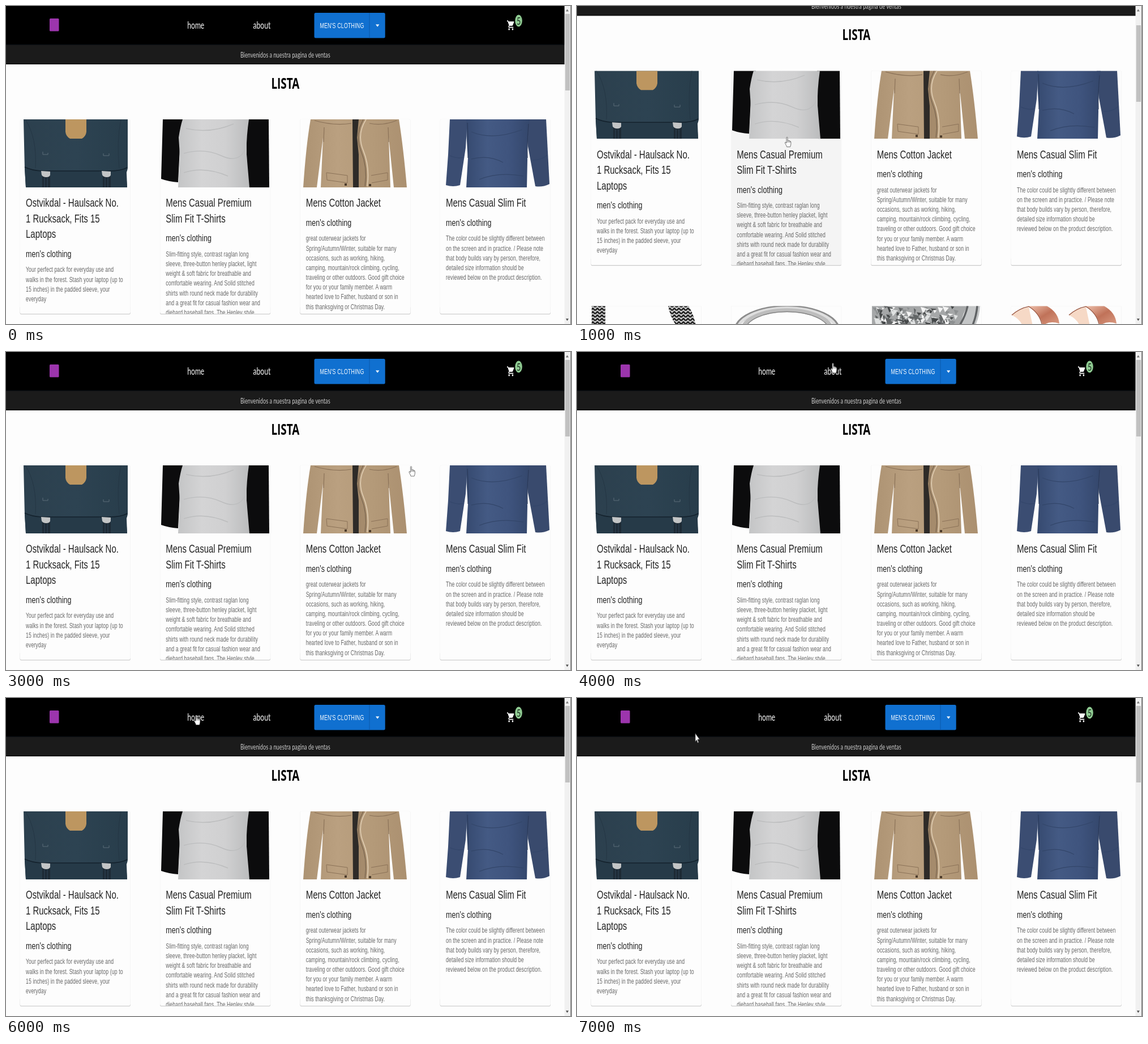
Animation, 998 px wide and 561 px high, one loop 8000 ms. Source, as an HTML page:

```html
<!DOCTYPE html>
<html lang="en">
<head>
<meta charset="utf-8">
<title>Shop list</title>
<style>
  html, body { margin: 0; width: 100%; height: 100%; overflow: hidden; background: #fdfdfd; }
  svg { display: block; }
  text { font-family: "Liberation Sans", Arial, sans-serif; white-space: pre; }
  .nav { font-family: Lato, sans-serif; }
  .head { font-family: "Open Sans", sans-serif; font-weight: 700; }
</style>
</head>
<body>
<svg id="stage" width="998" height="561" xmlns="http://www.w3.org/2000/svg"></svg>
<script>
// The page is 1600 x 654 px, shown squeezed to the stage.
const SX = 998 / 1600, SY = 0.858;
const SCALE = `scale(${SX} ${SY})`;
const TOP = 200, LINE = 27.47, ROW2 = 615;

const text = (x, y, size, str, attrs = '') =>
  `<text transform="translate(${x} ${y}) ${SCALE}" font-size="${size}" ${attrs}>${str}</text>`;
const rect = (x, y, w, h, fill, attrs = '') =>
  `<rect x="${x}" y="${y}" width="${w}" height="${h}" fill="${fill}" ${attrs}/>`;
const path = (d, fill, attrs = '') => `<path d="${d}" fill="${fill}" ${attrs}/>`;
const line = (d, color, width = 1, attrs = '') =>
  path(d, 'none', `stroke="${color}" stroke-width="${width}" ${attrs}`);
const gradient = (id, colors, attrs = '') => `<linearGradient id="${id}" ${attrs}>` +
  colors.map((c, i) => `<stop offset="${i / (colors.length - 1)}" stop-color="${c}"/>`).join('') +
  '</linearGradient>';

function backpack() {
  const buckle = x => rect(x + 2, 300, 14, 20, '#1d2a35') +
    line(`M${x + 6} 303v17m5 -17v17`, '#33475a', 1) +
    path(`M${x} 291l16 1v6q-1 4 -7 4t-8 -4z`, '#c3c5c6');
  return path('M31 200H215V286Q214 292 212 294L214 320H35L33 288Z', 'url(#pack)') +
    path('M33 284Q45 289 62 291H182Q204 291 214 285L213 294L214 320H35Z', '#263a48') +
    line('M33 284Q45 290 62 291H182Q204 291 214 285', '#14222d', 1.6) +
    line('M34 200Q55 232 52 286M203 200Q195 240 200 286', '#243644', 1) +
    line('M65 257v5h9v-3M172 260v4h10v-4', '#5a6c78', 1) +
    path('M105 200H142V222Q141 230 134 234H113Q106 230 105 222Z', '#bd9660') +
    buckle(62) + buckle(169);
}

function tee() {
  return path('M277 200H316L308 232L304 311Q288 310 274 305Z', '#0c0c0d') +
    path('M424 200H464L465 320H426Z', '#0c0c0d') +
    path('M312 200H429Q424 235 425 262L430 320H304L307 262L305 232Q308 212 312 200Z', 'url(#tee)') +
    line('M318 216Q360 226 402 208M314 260Q350 250 380 264T422 254M314 294Q350 282 392 300', '#bcbdbe', 1.4);
}

function jacket() {
  return path('M538 200H694Q702 250 708 320H685L676 232L679 320H556L560 232L549 320H525Q530 246 538 200Z', 'url(#jacket)') +
    path('M612 200H636Q620 226 630 255T637 320H613Z', '#a58b6c') +
    path('M612 200H623L620 232L623 262V320H613Z', '#2e2b28') +
    line('M636 200Q619 226 631 255T638 318', '#dcc8ac', 2) +
    line('M631 200Q615 228 627 256T634 318', '#6f5c48', 1) +
    line('M545 202Q580 212 610 207M642 207Q665 212 690 202M562 214L561 240M675 214L676 240', '#8b7258', 1.2) +
    line('M566 294L603 299V312L567 307ZM645 299L674 294V307L646 312', '#8b7258', 1) +
    path('M598 313h4v4h-4zM641 314h4v4h-4z', '#4c3b2b');
}

function slimShirt() {
  return path('M784 200H815L812 250L802 316Q790 320 777 316L781 262Z', '#3b4d72') +
    path('M918 200H954L960 314Q948 320 935 318L922 248Z', '#394a6d') +
    path('M813 200H925Q920 244 921 272L920 320H813L816 268Q813 236 813 200Z', 'url(#slim)') +
    line('M815 206Q817 240 816 268M923 208Q920 240 921 268', '#2b3a59', 1.2) +
    line('M822 222Q860 238 912 218M822 270Q852 262 878 276M836 306Q870 292 914 300M784 264q14 6 24 3M930 272q16 0 26 -9', '#33466a', 1.3);
}

function bracelet() {
  return rect(26, ROW2, 24, 40, 'url(#weave)') +
    path('M161 615H197Q207 630 211 655H180Q166 640 161 615Z', 'url(#weave)');
}

function ring() {
  const arc = (r, color, w) =>
    `<ellipse cx="371" cy="659" rx="${r}" ry="${r * .46}" fill="none" stroke="${color}" stroke-width="${w}"/>`;
  return arc(90, '#8c8c8c', 8) + arc(88, '#dedede', 5) + arc(79, '#bdbdbd', 7) + arc(74, '#858585', 1.5);
}

function sparkle() {
  let seed = 7, out = path('M521 615H690Q681 628 676 655H521Z', '#a5a7a8');
  const rnd = () => (seed = seed * 16807 % 2147483647) / 2147483647;
  const shades = ['#454849', '#8d9091', '#e0e2e2', '#f4f4f4', '#636667'];
  for (let i = 0; i < 170; i++) {
    const y = ROW2 + rnd() * 33, x = 522 + rnd() * (150 - (y - ROW2) * .3);
    const w = 4 + rnd() * 8, h = 3 + rnd() * 7;
    out += path(`M${x.toFixed(1)} ${y.toFixed(1)}l${w.toFixed(1)} ${(h * .3).toFixed(1)}l${(-w * .6).toFixed(1)} ${h.toFixed(1)}z`, shades[i % 5]);
  }
  return out + path('M690 615H712Q711 636 701 655H670Q684 638 690 615Z', '#c4c6c7') +
    line('M690 615Q685 637 672 655M707 615Q705 637 696 655', '#606365', 3.5);
}

function roseRings() {
  const one = x => `<g transform="translate(${x} 0)">` +
    path('M0 631Q14 619 30 617L38 655H20Q18 640 0 631Z', '#f6d9c6') +
    path('M28 615H62Q82 626 84 646Q66 640 55 650Q50 628 28 615Z', 'url(#rose)') +
    line('M0 631Q14 619 30 616Q50 628 54 651', '#96543f', 1.3) + '</g>';
  return one(768) + one(869);
}

const products = [
  [25, ['Ostvikdal - Haulsack No.', '1 Rucksack, Fits 15', 'Laptops'], [
    'Your perfect pack for everyday use and',
    'walks in the forest. Stash your laptop (up to',
    '15 inches) in the padded sleeve, your', 'everyday'], backpack, bracelet],
  [272.3, ['Mens Casual Premium', 'Slim Fit T-Shirts'], [
    'Slim-fitting style, contrast raglan long',
    'sleeve, three-button henley placket, light',
    'weight &amp; soft fabric for breathable and',
    'comfortable wearing. And Solid stitched',
    'shirts with round neck made for durability',
    'and a great fit for casual fashion wear and',
    'diehard baseball fans. The Henley style'], tee, ring],
  [519.7, ['Mens Cotton Jacket'], [
    'great outerwear jackets for',
    'Spring/Autumn/Winter, suitable for many',
    'occasions, such as working, hiking,',
    'camping, mountain/rock climbing, cycling,',
    'traveling or other outdoors. Good gift choice',
    'for you or your family member. A warm',
    'hearted love to Father, husband or son in',
    'this thanksgiving or Christmas Day.'], jacket, sparkle],
  [767, ['Mens Casual Slim Fit'], [
    'The color could be slightly different between',
    'on the screen and in practice. / Please note',
    'that body builds vary by person, therefore,',
    'detailed size information should be',
    'reviewed below on the product description.'], slimShirt, roseRings]
];

const frame = (x, y, body) =>
  rect(x - .3, y + 330, 195.1, 14, '#c6c6c6', 'rx="2.5"') +
  rect(x - .4, y - .3, 195.3, 342, '#f2f2f2', 'rx="2.5"') +
  `<svg x="${x}" y="${y}" width="194.5" height="343" viewBox="${x} ${y} 194.5 343">` +
  rect(x, y, 194.5, 343, '#fdfdfd', 'rx="2.5"') + body + '</svg>';

function card([x, title, body, photo, nextPhoto], i) {
  const left = x + 10, shift = (title.length - 1) * LINE;
  const words =
    title.map((s, k) => text(left, 354.4 + k * LINE, 24, s, 'fill="#222"')).join('') +
    text(left, 387.9 + shift, 20, "men's clothing", 'fill="#222" letter-spacing=".0075em"') +
    body.map((s, k) => text(left, 414.4 + shift + k * 17.18, 14, s,
      'fill="#666" letter-spacing=".0107em"')).join('');
  const hover = i === 1 ? rect(x, TOP, 194.5, 343, '#f4f4f4', 'id="hover"') : '';
  return frame(x, TOP, hover + `<svg x="0" y="${TOP}" width="998" height="120" viewBox="0 ${TOP} 998 120">${photo()}</svg>` + words) +
    frame(x, ROW2, nextPhoto());
}

const cart = 'M7 18c-1.1 0-2 .9-2 2s.9 2 2 2 2-.9 2-2-.9-2-2-2zM1 2v2h2l3.6 7.6-1.35 2.44c-.16.28-.25.61-.25.96 0 1.1.9 2 2 2h12v-2H7.42c-.14 0-.25-.11-.25-.25l.03-.12.9-1.63h7.45c.75 0 1.41-.41 1.75-1.03l3.58-6.49A1 1 0 0 0 20 4H5.21l-.94-2H1zm16 16c-1.1 0-2 .9-2 2s.9 2 2 2 2-.9 2-2-.9-2-2-2z';

const header =
  rect(0, 0, 987, 69, '#000') + rect(0, 68, 987, 35, '#1b1b1b') + rect(0, 67.5, 987, 1.5, '#0b0e13') +
  rect(0, 101.5, 987, 1.5, '#111') +
  rect(77, 22, 16.5, 22.5, '#9c35ad', 'rx="1.5"') +
  text(320.3, 40, 19.4, 'home', 'class="nav" fill="#fff"') +
  text(436.5, 40, 19.4, 'about', 'class="nav" fill="#fff"') +
  rect(544.5, 12, 125.2, 44.5, '#1070d0', 'rx="2.5"') + rect(641.6, 12, .8, 44.5, '#0a55a4') +
  text(554.5, 38.6, 14, "MEN'S CLOTHING", 'fill="#fff" letter-spacing=".0286em"') +
  path('M653 32.4h6.4l-3.2 4.4z', '#fff') +
  path(cart, '#fff', `transform="translate(884.3 23.8) ${SCALE}"`) +
  '<ellipse cx="905.5" cy="26" rx="6.3" ry="10.4" fill="#8fcb92"/>' +
  text(905.5, 32.6, 20, '5', 'class="nav" fill="#16261a" text-anchor="middle"') +
  text(493.3, 91, 14.8, 'Bienvenidos a nuestra pagina de ventas', 'class="nav" fill="#cdcdcd" text-anchor="middle"') +
  text(493.4, 145.6, 30.3, 'LISTA', 'class="head" fill="#000" text-anchor="middle"');

const scrollbar = rect(986.5, 0, 11.5, 561, '#f1f1f1') + rect(997, 0, 1, 561, '#777') +
  path('M988.8 9.5h5l-2.5 -4z', '#777') + path('M988.8 551.5h5l-2.5 4z', '#505050') +
  rect(987.8, 14, 8.2, 135, '#c1c1c1', 'id="thumb"');

const pointer = (id, d, extra = '') => `<g id="${id}"><g transform="${SCALE}" stroke="#444" stroke-width="1" stroke-linejoin="round">` +
  path(d, '#fff') + extra + '</g></g>';
const cursors =
  pointer('arrow', 'M0 0V17L4 13.3L6.7 19.4L9.3 18.3L6.6 12.3H12Z') +
  pointer('hand', 'M-1.6 2Q0 -.8 1.6 2V8Q4 6.4 5 8.4Q7.4 7.2 8.2 9.4Q10.8 8.8 11 11.4V15Q10.6 18 9 21H-.6Q-2 17.6 -5.4 13.6Q-6 10.6 -3.6 11.4L-1.6 13.4Z',
    line('M1.6 8v4M5 8.4v3.6M8.2 9.4v3', '#444', 1));

const stage = document.getElementById('stage');
stage.innerHTML = '<defs>' +
  gradient('pack', ['#2c404e', '#2d4352', '#283d4b']) +
  gradient('tee', ['#c4c5c6', '#d4d4d5', '#d0d0d1', '#bbbcbd']) +
  gradient('jacket', ['#ad9373', '#baa080', '#b49a79', '#ab9070']) +
  gradient('slim', ['#364a70', '#445a84', '#3f547e', '#34476c']) +
  gradient('rose', ['#f0c3ae', '#c07259', '#dc9d84'], 'x2="1" y2="1"') +
  '<pattern id="weave" width="8" height="6" patternUnits="userSpaceOnUse">' +
  rect(0, 0, 8, 6, '#d8d8d8') + line('M0 5L4 1L8 5', '#1d1d1d', 2.6) + '</pattern></defs>' +
  rect(0, 0, 998, 561, '#fdfdfd') +
  `<g id="page">${header}${products.map(card).join('')}</g>` + scrollbar + cursors;

// One step per second: pointer, its tip, scroll offset, thumb offset, card hover
const steps = [
  [null, 0, 0, 0, 0, 0],
  ['hand', 371, 230.5, 85.8, 20, 1],
  ['arrow', 520.5, 177.5, 0, 0, 1],
  ['hand', 715.5, 201, 0, 0, 0],
  ['hand', 452, 19, 0, 0, 0],
  ['hand', 339.5, 28, 0, 0, 0],
  ['hand', 336, 29.5, 0, 0, 0],
  ['arrow', 209, 62.5, 0, 0, 0]
];
const STEP = 1000;
const el = id => document.getElementById(id);
const move = (id, x, y) => el(id).setAttribute('transform', `translate(${x} ${y})`);
const start = performance.now();
let shown = -1;

function draw(now) {
  const i = Math.floor(Math.max(0, now - start) / STEP) % steps.length;
  if (i !== shown) {
    shown = i;
    const [kind, x, y, scroll, thumb, hover] = steps[i];
    move('page', 0, -scroll);
    move('thumb', 0, thumb);
    el('hover').setAttribute('opacity', hover);
    for (const id of ['arrow', 'hand']) {
      el(id).setAttribute('visibility', id === kind ? 'visible' : 'hidden');
      move(id, x, y);
    }
  }
  requestAnimationFrame(draw);
}
draw(start);
</script>
</body>
</html>
```
